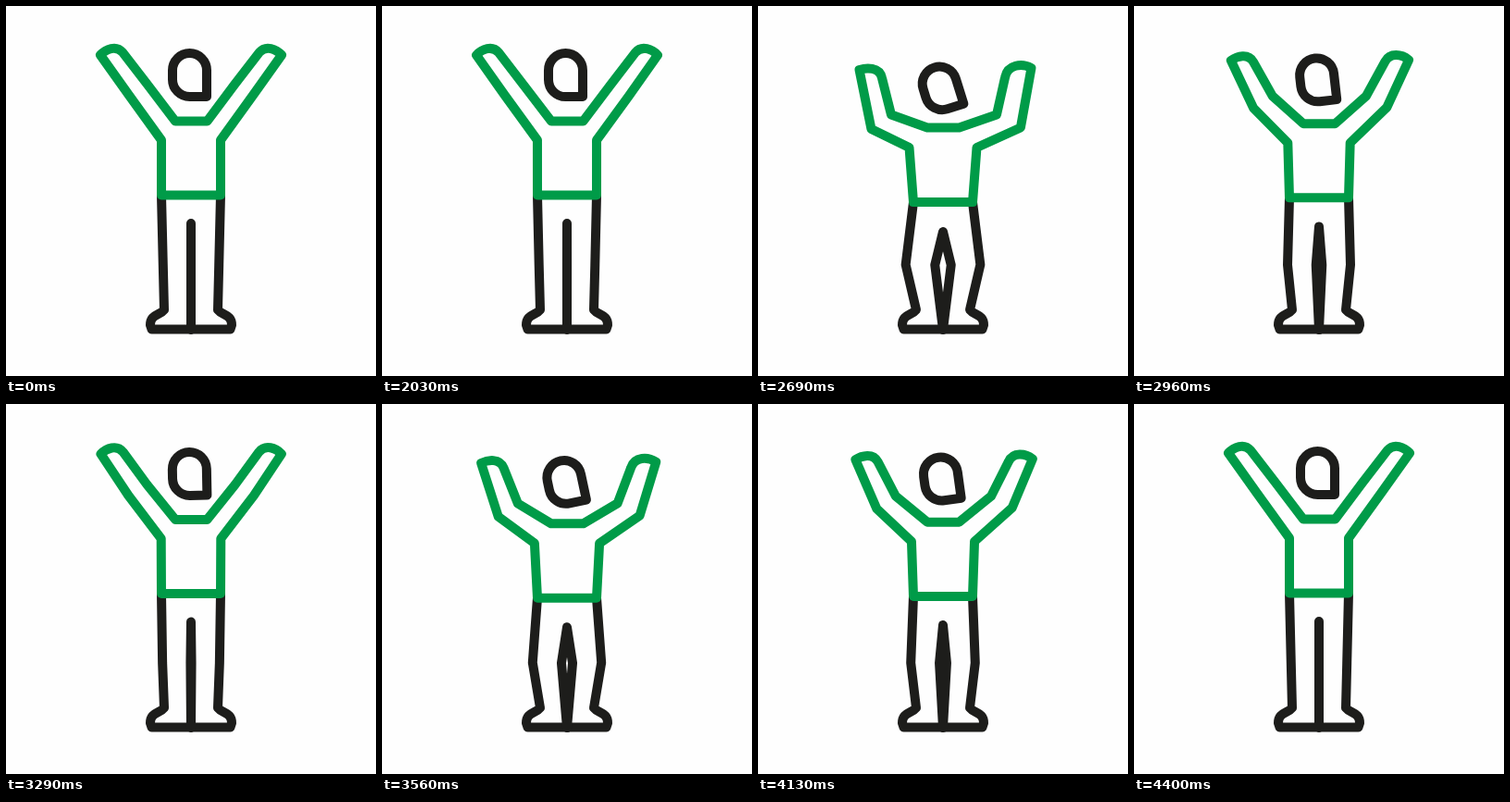
These frames come from a looping animation (400 by 400 pixels, 4460 ms). An HTML page:

```html
<!DOCTYPE html>
<html lang="en">
<head>
<meta charset="utf-8">
<title>Arm and knee bends</title>
<style>
  html, body { margin: 0; width: 100%; height: 100%; overflow: hidden; background: #fefefe; }
  svg { display: block; width: 100%; height: 100%; }
  path { fill: none; stroke: #1d1d1b; stroke-width: 10; stroke-linecap: round; stroke-linejoin: round; }
  #shirt { stroke: #009b48; }
</style>
</head>
<body>
<svg viewBox="0 0 400 400">
  <path id="legL"/>
  <path id="legR" transform="matrix(-1 0 0 1 400 0)"/>
  <path id="inseam"/>
  <path id="head" d="M217 98H198.5A18.5 18.5 0 0 1 180 79.5V69.5A18.5 18.5 0 0 1 217 69.5Z"/>
  <path id="shirt"/>
</svg>
<script>
const LOOP = 4460, START = 2000, HALF = 600, MOVES = 4, STEP = 30;
const el = id => document.getElementById(id);

// Each shape: [standing pose, bent pose]
const shirt = [
  `M168 204.5 L168 145 L133 96.5 L102 53 C108 46.5 119 42 126 50 L153 85 L183 124.5
   L217.5 124.5 L247 85 L274 50 C281 42 292 46.5 298 53 L267 96.5 L232 145 L232 204.5Z`,
  `M168 212.5 L163.2 153.5 L121.8 135.4 L110 70 C117.5 68 132 67 134.5 79.5 L143.4 119.6 L183 132
   L217.5 132 L258.7 119.6 L266.6 79 C269 64.5 285 62.5 295.3 68 L285 133.7 L236.8 153.5 L232 212.5Z`
];
const foot = 'L171 328.5 C166 335 156 333 156 345 L157.5 349.5 H200';
const leg = ['M168 204.5 L169.8 280' + foot, 'M168 212.5 L159 279.5' + foot];
const inseam = [
  'M200 235 L200 280 L200 350 L200 280Z',
  'M200 244.6 L190.7 280 L200 350 L209.3 280Z'
];

const NUM = /-?\d+(\.\d+)?/g;
function mix([a, b], p) {
  const ends = b.match(NUM);
  let i = 0;
  return a.replace(NUM, n => +n + (ends[i++] - n) * p);
}

function bendAt(ms) {
  const t = Math.floor((ms - START) / STEP) * STEP;
  if (t <= 0 || t >= HALF * MOVES) return 0;
  const x = (t % HALF) / HALF;
  const p = x * x * (3 - 2 * x);
  return Math.floor(t / HALF) % 2 ? 1 - p : p;
}

function draw(ms) {
  const p = bendAt(ms);
  el('shirt').setAttribute('d', mix(shirt, p));
  el('legL').setAttribute('d', mix(leg, p));
  el('legR').setAttribute('d', mix(leg, p));
  el('inseam').setAttribute('d', mix(inseam, p));
  el('head').setAttribute('transform',
    `translate(${-p} ${15.3 * p}) rotate(${-18.5 * p} 198.5 74)`);
}

let began;
function tick(now) {
  began ??= now;
  draw((now - began) % LOOP);
  requestAnimationFrame(tick);
}
draw(0);
requestAnimationFrame(tick);
</script>
</body>
</html>
```
